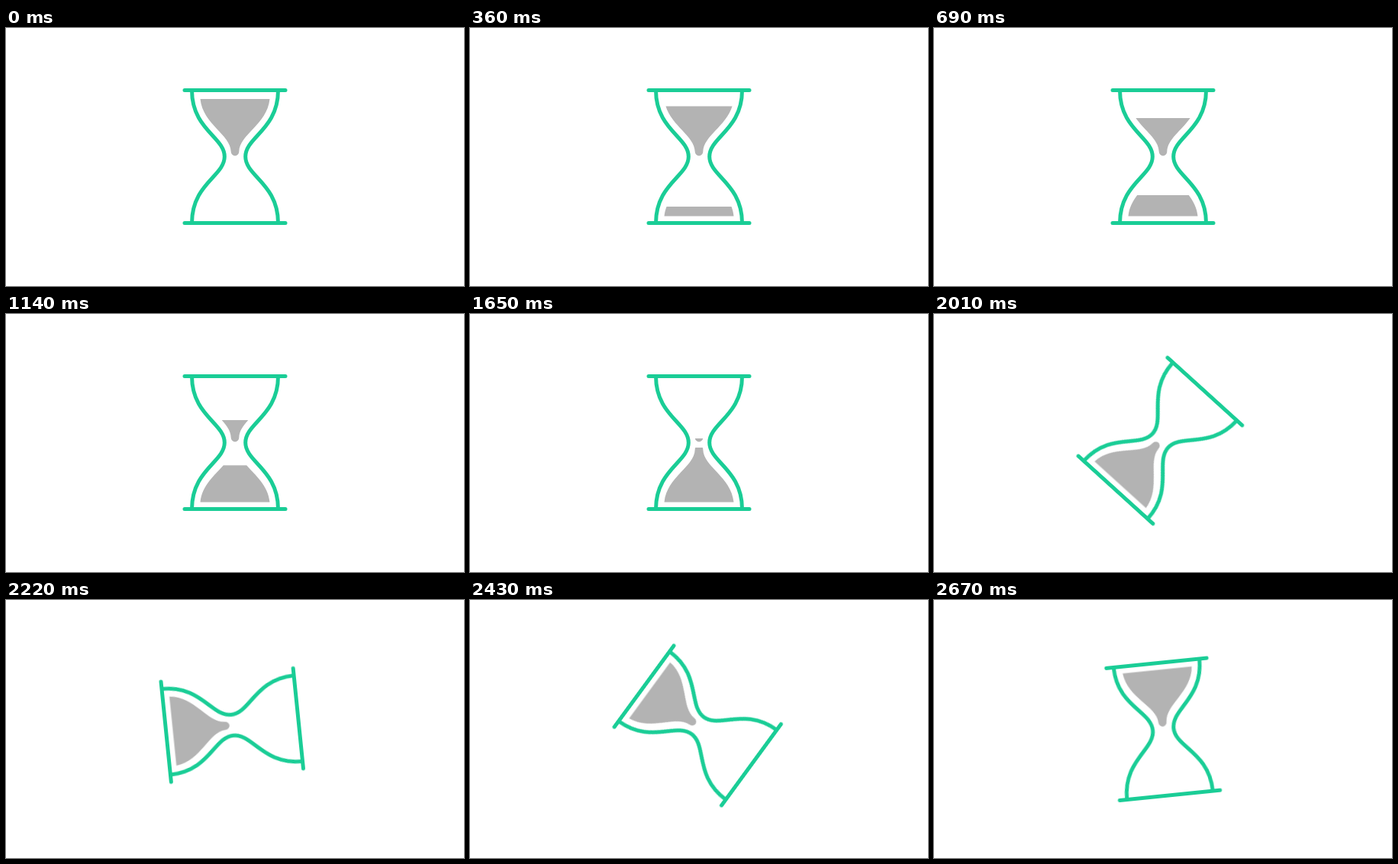
These frames come from a looping animation (600 px wide and 338 px high, 2700 ms). An HTML page:

```html
<!DOCTYPE html>
<html lang="en">
<head>
<meta charset="utf-8">
<title>Hourglass loader</title>
<style>
  html, body { margin: 0; width: 100%; height: 100%; overflow: hidden; background: #fff; }
  svg { display: block; width: 100%; height: 100%; }

  .frame { fill: none; stroke: #1acd96; stroke-width: 5; stroke-linecap: round; }
  .sand { fill: #b3b3b3; }

  .turn, .drain, .fill { animation: 2700ms linear infinite; }
  .turn { animation-name: turn; transform-origin: 305.5px 164.8px; }
  .drain { animation-name: drain; }
  .fill { animation-name: fill; }

  /* Sand runs for two thirds of the loop, then the glass flips. */
  @keyframes turn {
    0%, 66.6667% { transform: translate(0, 0) rotate(0deg); }
    100% { transform: translate(-10.7px, 9px) rotate(180deg); }
  }
  @keyframes drain {
    0% { transform: translateY(0); }
    66.6667%, 100% { transform: translateY(84.4px); }
  }
  @keyframes fill {
    0% { transform: translateY(0); }
    66.6667%, 100% { transform: translateY(-82.5px); }
  }
</style>
</head>
<body>
<svg viewBox="0 0 600 338">
  <defs>
    <clipPath id="upper"><rect class="drain" x="240" y="85.6" width="120" height="90"/></clipPath>
    <clipPath id="lower"><rect class="fill" x="240" y="250.6" width="120" height="90"/></clipPath>
    <path id="heap" d="M254.5 93H345.5C342 126.5 306 139 305.3 162A5.3 5.4 0 0 1 294.7 162C294 139 258 126.5 254.5 93Z"/>
    <path id="side" d="M243.5 81.5C243.5 133 286.3 143 286.3 168.5S243.5 204 243.5 255.5"/>
  </defs>
  <g class="turn">
    <g class="sand">
      <g clip-path="url(#upper)"><use href="#heap"/></g>
      <g clip-path="url(#lower)"><use href="#heap" transform="matrix(1 0 0 -1 0 339.5)"/></g>
    </g>
    <g class="frame">
      <use href="#side"/>
      <use href="#side" transform="matrix(-1 0 0 1 600 0)"/>
      <path d="M234 81.5H366M234 255.5H366"/>
    </g>
  </g>
</svg>
</body>
</html>
```
